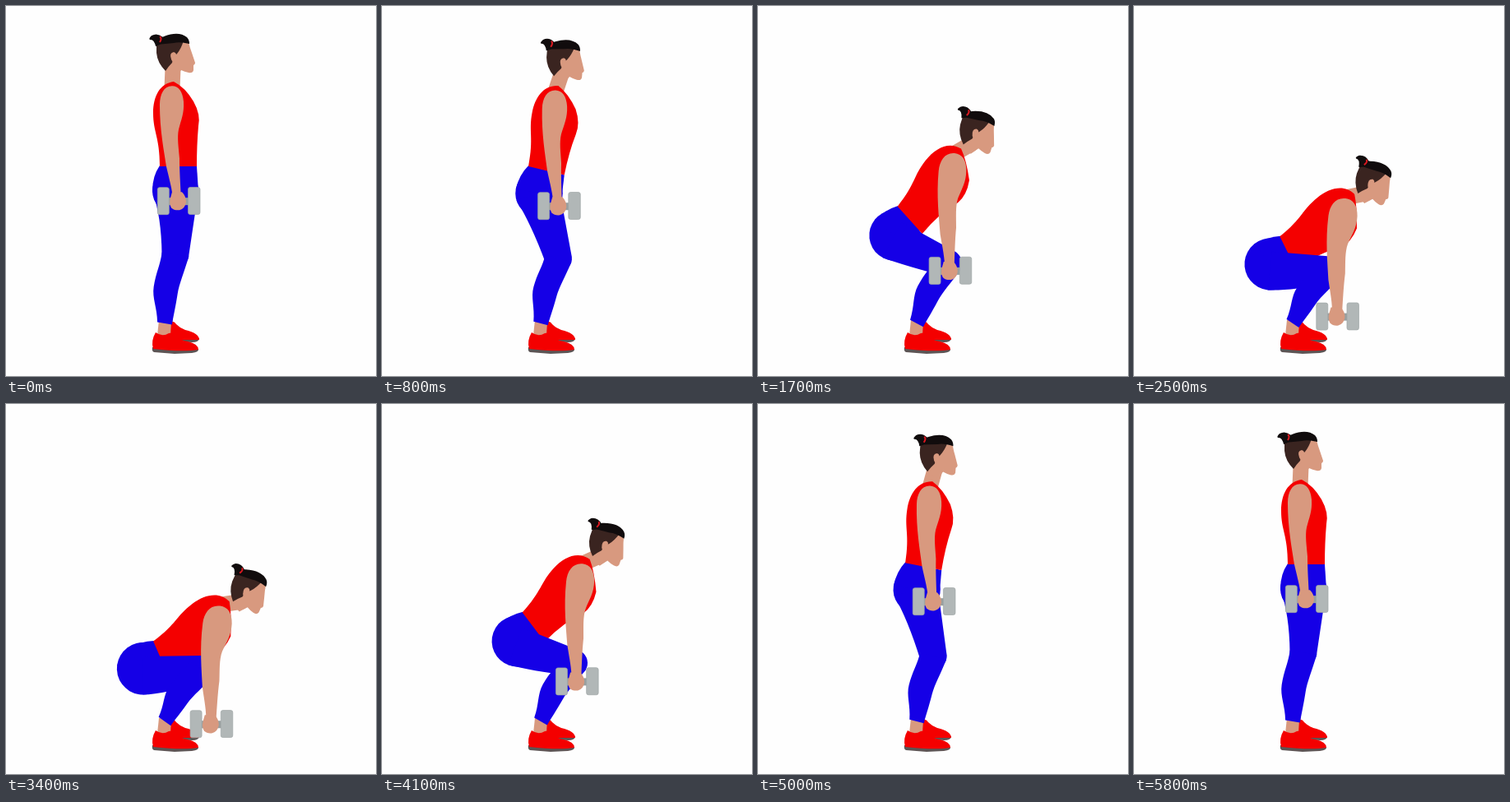
Write an HTML page that moves like this. It is 450 by 450 pixels and loops after 5900 ms.

```html
<!DOCTYPE html>
<html lang="en">
<head>
<meta charset="utf-8">
<title>Dumbbell squat</title>
<style>
  html, body { margin: 0; width: 100%; height: 100%; overflow: hidden; background: #fefefe; }
  svg { display: block; width: 100vw; height: 100vh; }
  .skin { fill: #d8997f; }
  .red { fill: #f40000; }
  .sole { fill: #5c5555; }
  .blue { fill: #1500e6; }
  .hair { fill: #110c0d; }
  .plate { fill: #b1b7b7; stroke: #a0a7a7; stroke-width: .7; }
</style>
</head>
<body>
<svg viewBox="0 0 450 450">
  <path class="skin" d="M186 382L203 378L203 390L198 404L184 401Z"/>
  <path class="sole" d="M207 403L235 404Q235 409 226 409L207 408Z"/>
  <path class="red" d="M201 385Q204 382 207 387Q212 392 218 394Q235 398 235 406L212 406L200 400Z"/>
  <path class="sole" d="M178 415L234 417Q235 421 226 422L205 423L180 421Q177 420 178 415Z"/>
  <path class="red" d="M182 397Q190 403 198 398Q203 396 207 401Q213 407 221 408Q234 411 234 418Q215 421 179 417Q176 407 182 397Z"/>

  <path id="neck" fill="none" stroke="#d8997f" stroke-width="19" stroke-linecap="round"/>
  <g id="pelvis" class="blue">
    <circle id="seat"/>
    <path id="waist"/>
  </g>
  <path id="tank" class="red"/>
  <path id="thigh" class="blue"/>
  <path id="shin" class="blue" d="M-9 0C-12 -18 -20 -28 -20 -42C-20 -60 -16 -70 -16.500 -85L16.500 -85C14 -65 10 -50 10 -38C10 -20 9 -10 9 0Z"/>

  <!-- Head, with the ear at the origin -->
  <g id="head">
    <path class="skin" d="M-9 -15L18 -17Q20 -9 22 -4L26 8Q26 10 24 11L24 17Q23 21 18 20Q13 19 9 17L2 26L-10 20Z"/>
    <path fill="#3a2420" d="M-21 -17L12 -19Q9 -9 4 -3Q-1 1 -2 8Q-6 12 -10 18Q-20 8 -21 -4Z"/>
    <path class="skin" d="M-3 4Q-6 -4 0 -5Q5 -4 2 4Q-1 9 -3 4Z"/>
    <path class="hair" d="M-21 -14Q-18 -22 -12 -24Q6 -31 16 -23Q19 -20 19 -15Q7 -18 0 -16Q-10 -15 -21 -14Z"/>
    <path class="hair" d="M-13 -23Q-20 -29 -27 -25Q-31 -21 -29 -20Q-24 -21 -22 -12Q-15 -14 -13 -19Z"/>
    <path fill="none" stroke="#d81820" stroke-width="2" d="M-17 -24Q-14 -22 -17 -17"/>
  </g>

  <!-- Weight and fist, with the grip at the origin -->
  <g id="weight">
    <rect x="-12" y="-5" width="25" height="9" fill="#989f9f"/>
    <rect class="plate" x="-24.700" y="-17.500" width="14" height="33" rx="2.500"/>
    <rect class="plate" x="12.500" y="-17.700" width="14.500" height="33" rx="2.500"/>
  </g>
  <path id="arm" class="skin" d="M0 -15C-10 -15 -15 -5 -15 8C-15 38 -10 63 -7 83C-3 100 0 110 1 122L11 122C10 103 9 88 9 73C8 60 6 48 8 38C11 26 15 18 14 4C13 -8 8 -15 0 -15Z"/>
  <path id="fist" class="skin" d="M-7 -12L5 -12Q10 -7 10 0Q9 8 2 10Q-4 11 -8 7Q-11 2 -9 -5Z"/>
</svg>
<script>
const LOOP = 5900, STEP = 100;
const ANKLE = [193, 386], KNEE_R = 16.5;

// Key poses on the way down: moment in ms, hip, knee, lean of the trunk in degrees.
const poses = [
  { at: 0,    rig: [206, 225, 206, 302, 0] },
  { at: 800,  rig: [191, 228, 214.5, 307, 11] },
  { at: 1700, rig: [166, 279, 231.5, 313, 38.4] },
  { at: 2500, rig: [166, 314, 237, 321, 51] },
  { at: 3050, rig: [167, 326, 238, 323, 54] }
];

// Moments on the way up paired with the matching moments of the way down.
const rise = [[3050, 3050], [3600, 2600], [4100, 1890], [4800, 890], [5400, 350], [5800, 0]];

function phase(t) {
  if (t <= rise[0][0]) return t;
  const i = rise.findIndex(([end]) => t <= end);
  if (i < 0) return 0;
  const [t0, q0] = rise[i - 1], [t1, q1] = rise[i];
  return q0 + (q1 - q0) * (t - t0) / (t1 - t0);
}

const slope = (i, j) => (poses[i + 1].rig[j] - poses[i].rig[j]) / (poses[i + 1].at - poses[i].at);

function tangent(i, j) {
  if (i === 0 || i === poses.length - 1) return 0;
  const before = poses[i].at - poses[i - 1].at, after = poses[i + 1].at - poses[i].at;
  return (slope(i - 1, j) * after + slope(i, j) * before) / (before + after);
}

// Cubic Hermite blend of the key poses at moment q.
function rigAt(q) {
  let i = 0;
  while (i < poses.length - 2 && q > poses[i + 1].at) i++;
  const a = poses[i], b = poses[i + 1], h = b.at - a.at, u = (q - a.at) / h;
  const w = u * u * (3 - 2 * u);
  return a.rig.map((v, j) => v + (b.rig[j] - v) * w
    + h * (tangent(i, j) * u * (1 - u) ** 2 - tangent(i + 1, j) * u * u * (1 - u)));
}

const RAD = Math.PI / 180;
const add = (a, b) => [a[0] + b[0], a[1] + b[1]];
const spin = ([x, y], deg) => {
  const c = Math.cos(deg * RAD), s = Math.sin(deg * RAD);
  return [x * c - y * s, x * s + y * c];
};
const set = (id, name, value) => document.getElementById(id).setAttribute(name, value);
const place = (id, [x, y], deg = 0, sx = 1, sy = 1) =>
  set(id, 'transform', `translate(${x} ${y}) rotate(${deg}) scale(${sx} ${sy})`);

function drawLeg(hip, knee, lean, seatR) {
  const [dx, dy] = [knee[0] - hip[0], knee[1] - hip[1]];
  const length = Math.hypot(dx, dy);
  const front = 28 - .25 * lean, back = 17 + .25 * lean;
  set('thigh', 'd', `M${front} 0L${KNEE_R} ${length}A${KNEE_R} ${KNEE_R} 0 0 1 ${-KNEE_R} ${length}`
    + `Q${-back} ${length * .4} ${-seatR} 0Z`);
  place('thigh', hip, Math.atan2(-dx, dy) / RAD);

  const [sx, sy] = [knee[0] - ANKLE[0], ANKLE[1] - knee[1]];
  place('shin', ANKLE, Math.atan2(sx, sy) / RAD, 1, Math.hypot(sx, sy) / 85);
}

function drawTrunk(hip, waist, lean, seatR) {
  // The waistband tilts a little more than the trunk.
  const [bx, by] = spin([45, 1], lean * .25);
  set('seat', 'r', seatR);
  set('waist', 'd', `M-19 -31Q-28 -18 ${-seatR} 0L28 0L${bx - 19} ${by - 31}Z`);
  place('pelvis', hip, lean);

  const chest = .2 * lean;
  set('tank', 'd', `M0 1C0 -35 -8 -40 -8 -64C-8 -84 0 -100 17 -102`
    + `Q31 -95 ${41 + chest} -78Q${50 + chest} -62 ${47 + chest} -48Q45 -25 ${bx} ${by}Z`);
  place('tank', waist, lean);
}

function draw(t) {
  const [hx, hy, kx, ky, lean] = rigAt(phase(t));
  const hip = [hx, hy], seatR = 28 + .07 * lean;
  const waist = add(hip, spin([-19, -31], lean));
  drawLeg(hip, [kx, ky], lean, seatR);
  drawTrunk(hip, waist, lean, seatR);

  const ear = add(waist, spin([0, .12 * lean - 134], 7.3 + 1.03 * lean));
  const nod = .46 * lean;
  const nape = add(ear, spin([-1, 14], nod)), collar = add(waist, spin([15, -94], lean));
  place('head', ear, nod);
  set('neck', 'd', `M${nape}L${collar}`);

  const shoulder = add(waist, spin([0, -83], 10.4 + 1.14 * lean));
  const reach = 126 + .07 * lean, swing = .14 * lean;
  const grip = add(shoulder, spin([0, reach], swing - 3.2));
  place('arm', shoulder, swing, 1 + .004 * lean, reach / 126);
  place('weight', grip);
  place('fist', grip);
}

const start = performance.now();
function tick() {
  const t = (performance.now() - start) % LOOP;
  draw(Math.floor(t / STEP) * STEP);
  requestAnimationFrame(tick);
}
draw(0);
requestAnimationFrame(tick);
</script>
</body>
</html>
```
